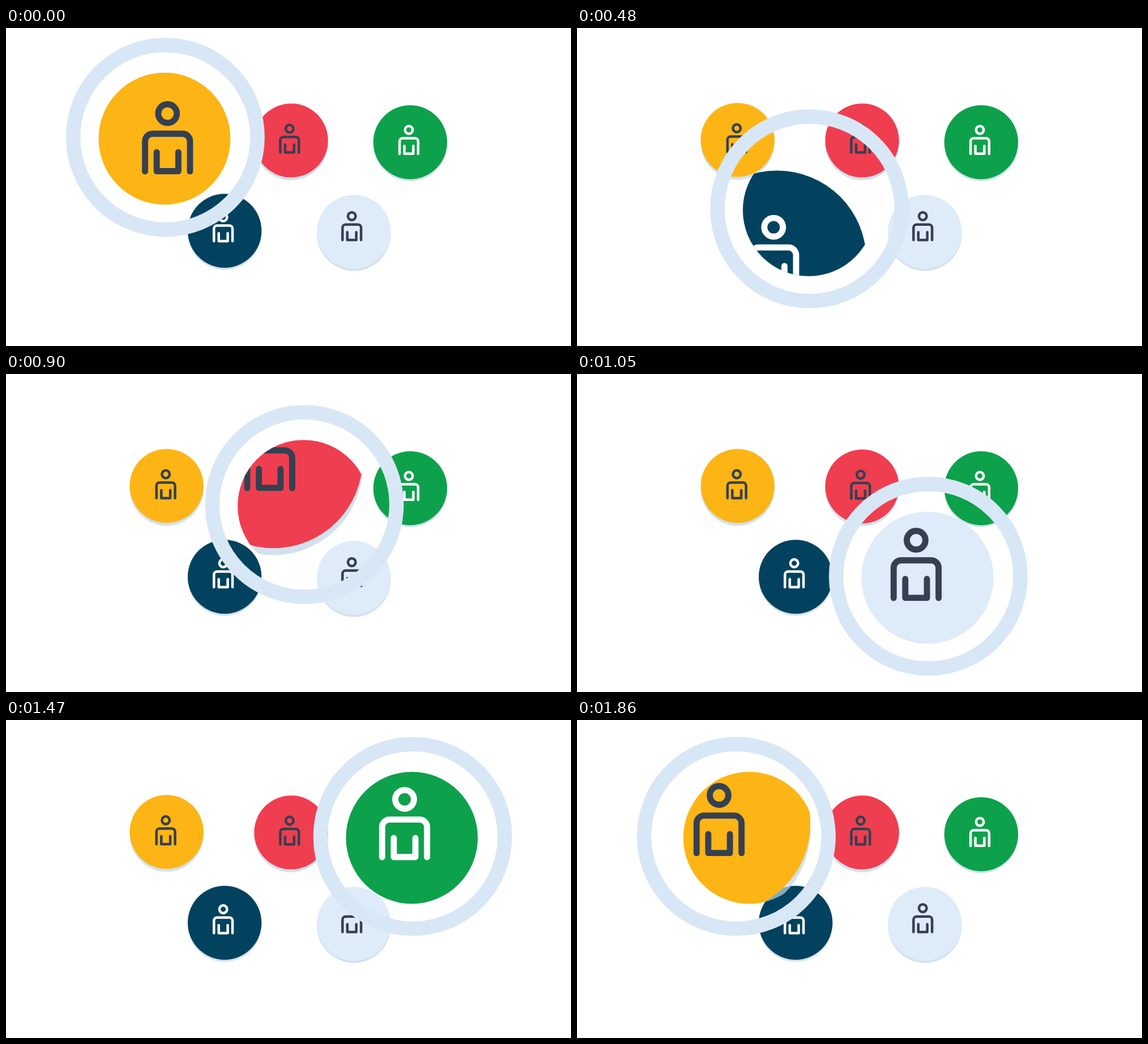
An HTML page for the animation above (1.89 s loop, 998 by 561 pixels).

```html
<!DOCTYPE html>
<html lang="en">
<head>
<meta charset="utf-8">
<title>Magnifier over people</title>
<style>
  html, body { margin: 0; width: 100%; height: 100%; overflow: hidden; background: #fff; }
  svg { display: block; width: 998px; height: 561px; }
</style>
</head>
<body>
<svg viewBox="0 0 998 561">
  <defs>
    <g id="person" fill="none" stroke-width="4.5" stroke-linecap="round" stroke-linejoin="round">
      <circle cy="-17.6" r="6.8"/>
      <path d="M-16.4 24.5V2.6a5.5 5.5 0 0 1 5.5-5.5h21.8a5.5 5.5 0 0 1 5.5 5.5V24.5"/>
      <path d="M-7.9 10.6V24.4H7.9V10.6"/>
    </g>
    <clipPath id="ringClip"><circle id="ringHole" r="151"/></clipPath>
    <clipPath id="glassClip"><circle id="glass" r="116.4"/></clipPath>
  </defs>
  <g id="scene"></g>
  <g clip-path="url(#ringClip)">
    <g clip-path="url(#glassClip)"><use id="zoomed" href="#scene"/></g>
  </g>
  <circle id="ring" r="162.8" fill="none" stroke="#d8e7f6" stroke-width="25.5"/>
</svg>
<script>
const LOOP = 1890, TICK = 30, MOVE = 210, ZOOM = 2.42;
const RING_DX = 1.4, RING_DY = -2.5;
const DARK = '#354051';

// disc centre, shadow drop, icon centre, disc and icon colours
const people = [
  { x: 283.7, y: 197.4, drop: 5,   ix: 282.2, iy: 194.5, fill: '#fdb515', ink: DARK },
  { x: 503.6, y: 198.4, drop: 5,   ix: 500.9, iy: 195.2, fill: '#ef3e50', ink: DARK },
  { x: 714,   y: 201.5, drop: 3.5, ix: 711.6, iy: 197.4, fill: '#0da14b', ink: '#fff' },
  { x: 386.2, y: 357.7, drop: 3.5, ix: 383.7, iy: 351.5, fill: '#02425f', ink: '#fff' },
  { x: 614.4, y: 359.7, drop: 3.5, ix: 610.8, iy: 349.6, fill: '#deebf9', ink: DARK }
];

// glass stops; the ring sets off one tick early on the last two moves
const stops = [
  { x: 280,   y: 195.2 },
  { x: 386.3, y: 351.1, glass: 30,   ring: 30 },
  { x: 502.5, y: 201.5, glass: 450,  ring: 450 },
  { x: 619.1, y: 359.3, glass: 870,  ring: 870 },
  { x: 716.9, y: 207.8, glass: 1290, ring: 1260 },
  { x: 280,   y: 207.8, glass: 1710, ring: 1680 }
];

const el = id => document.getElementById(id);

el('scene').innerHTML = people.map(p => `
  <circle cx="${p.x}" cy="${p.y + p.drop}" r="65.2" fill="#bfd4e7" fill-opacity=".7"/>
  <circle cx="${p.x}" cy="${p.y}" r="65.2" fill="${p.fill}"/>
  <use href="#person" x="${p.ix}" y="${p.iy}" stroke="${p.ink}"/>`).join('');

const smooth = p => p * p * (3 - 2 * p);

function position(t, part) {
  let { x, y } = stops[0];
  for (const stop of stops.slice(1)) {
    const p = Math.min(1, Math.max(0, (t - stop[part] + TICK) / MOVE));
    const e = smooth(p);
    x += (stop.x - x) * e;
    y += (stop.y - y) * e;
  }
  return { x, y };
}

function place(id, x, y) {
  el(id).setAttribute('cx', x);
  el(id).setAttribute('cy', y);
}

function draw(t) {
  const glass = position(t, 'glass');
  const ring = position(t, 'ring');
  place('glass', glass.x, glass.y);
  for (const id of ['ring', 'ringHole']) place(id, ring.x + RING_DX, ring.y + RING_DY);
  const shift = v => v * (1 - ZOOM);
  el('zoomed').setAttribute('transform',
    `translate(${shift(glass.x)} ${shift(glass.y)}) scale(${ZOOM})`);
}

const start = performance.now();
function frame() {
  const t = (performance.now() - start) % LOOP;
  draw(Math.floor(t / TICK) * TICK);
  requestAnimationFrame(frame);
}
frame();
</script>
</body>
</html>
```
